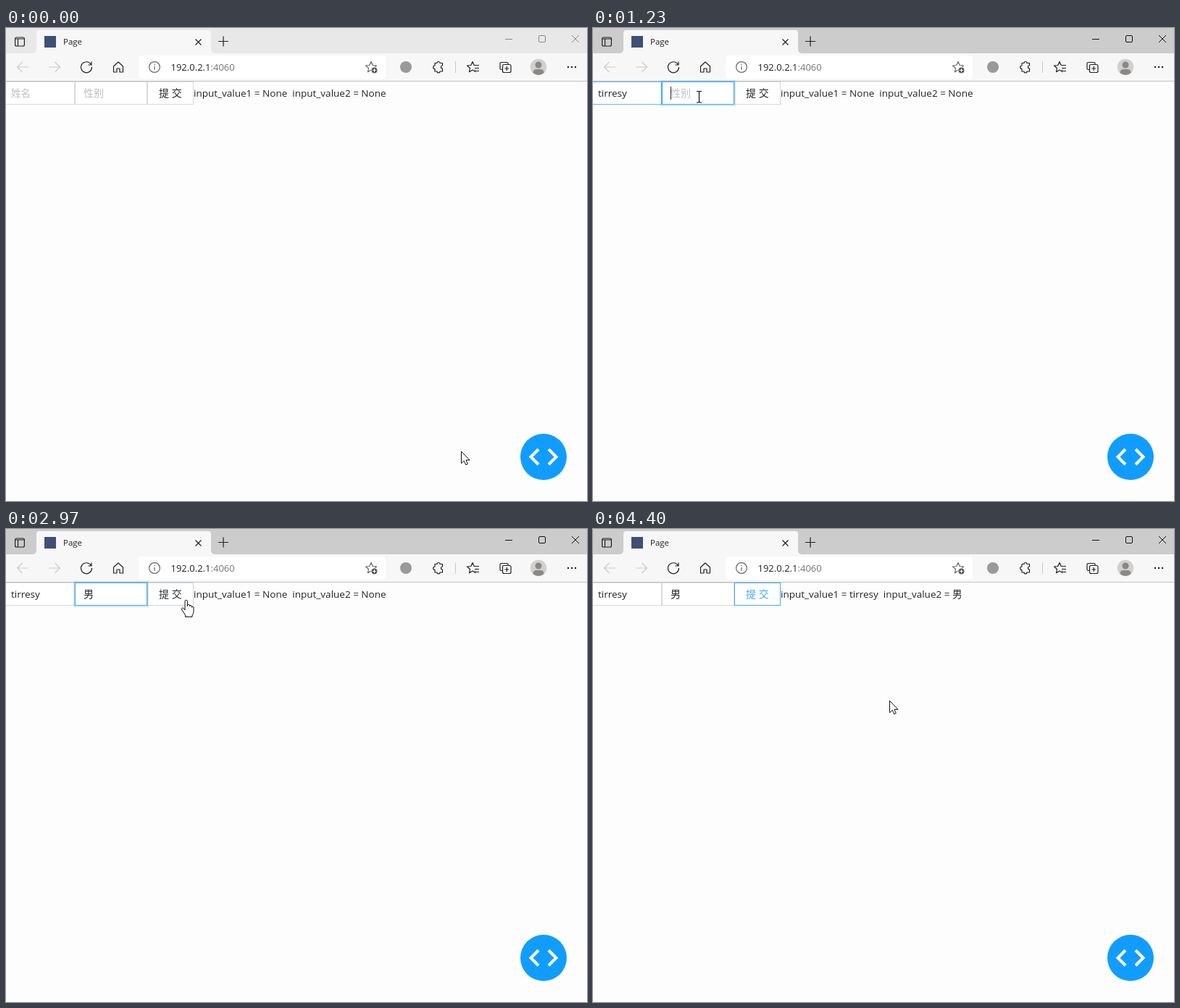
Write an HTML page that moves like this. It is 802x654 px and loops after 4430 ms.

```html
<!DOCTYPE html>
<html lang="zh-CN">
<head>
<meta charset="utf-8">
<title>Form</title>
<style>
  html, body { margin: 0; width: 100%; height: 100%; overflow: hidden; background: #fdfdfd; }
  svg { display: block; cursor: default; }
  text { font: 13.5px "Open Sans", "Noto Sans CJK SC", "Noto Sans CJK", sans-serif; fill: #222; }
  .cn { font-size: 14px; }
  .hint { fill: #bfbfbf; }
  .line { fill: none; stroke: #222; stroke-width: 1.2; }
  .off { stroke: #ccc; }
  .field { fill: #fff; stroke: #d9d9d9; }
  .blue { fill: none; stroke: #40a9ff; }
  .glow { fill: none; stroke: #1890ff; stroke-opacity: .2; stroke-width: 2; }
  .caret { stroke: #222; }
  .shape { fill: #fff; stroke: #111; stroke-linejoin: round; }
  #ime text { font: 16px "Noto Sans CJK SC", "Noto Sans CJK", sans-serif; }
  #ime .num { font: 13.33px "Liberation Mono", monospace; }
  #ime #typed { font: bold 16px "Liberation Sans", Arial, sans-serif; fill: #111; }
</style>
</head>
<body>
<svg width="802" height="654" viewBox="0 0 802 654">
  <!-- title bar -->
  <rect id="bar" width="802" height="36"/>
  <path d="M36 35q6 0 6-6V7q0-4 4-4H279q4 0 4 4V29q0 6 6 6z" fill="#f7f7f7"/>
  <rect class="line" x="12.6" y="13" width="12.8" height="12" rx="2"/>
  <path class="line" d="M13 15H25M16.5 15V25" stroke-width="2"/>
  <rect x="53" y="11" width="16" height="16" fill="#3f4f75"/>
  <text x="79" y="23" style="font-size:11.5px">Page</text>
  <path class="line" d="M261.5 15.5l8 8m0-8l-8 8M293 18.5h14m-7-7v14"/>
  <path id="controls" class="line" style="stroke-width:1" d="M689 15.5h10M737 10.5h6q1.500 0 1.500 1.500v6q0 1.500-1.500 1.500h-6q-1.500 0-1.500-1.500v-6q0-1.500 1.500-1.500M781 10l10 10m0-10l-10 10"/>

  <!-- toolbar -->
  <rect y="35" width="802" height="39" fill="#f7f7f7"/>
  <path d="M0 73.5H802" stroke="#c4c4c4"/>
  <rect x="183" y="38" width="341" height="32" rx="4" fill="#fff"/>
  <path class="line off" d="M31 54H15.500m7-7l-7 7 7 7M59 54H74.500m-7-7l7 7-7 7"/>
  <path class="line" d="M117.500 50.500A7.500 7.500 0 1 0 118.500 54M118 46.500v4.500h-4.500"/>
  <path class="line" d="M148.500 53l6.500-6 6.500 6v8h-4.500v-5h-4v5h-4.500z" stroke-linejoin="round"/>
  <g class="line" style="stroke:#666">
    <circle cx="205" cy="54" r="7.400"/>
    <path d="M205 53v5M205 50v1.500"/>
  </g>
  <text x="227.500" y="59" style="font-size:13px">192.0.2.1<tspan fill="#767676">:4060</tspan></text>
  <defs><path id="star" d="M0-7.500L2.200-2.500 7.500-2 3.500 1.500 4.500 6.800 0 4-4.500 6.800-3.500 1.500-7.500-2-2.200-2.500z"/></defs>
  <g class="line" stroke-linejoin="round">
    <use href="#star" x="504" y="54" stroke="#666"/>
    <use href="#star" x="644" y="54"/>
    <path d="M646 54.500h9M648 58.500h7" stroke="#f7f7f7" stroke-width="5"/>
    <path d="M646 51.500h7M647 55.500h6M648 59.500h5"/>
    <path d="M592 48.500h3a2 2 0 0 1 4 0h3.500v3.500a2 2 0 0 0 0 4v4h-3.500a2 2 0 0 1-4 0H592v-3.500a2 2 0 0 1 0-4.500z"/>
    <path d="M685 57.500h-1.500q-1.500 0-1.500-1.500v-7q0-1.500 1.500-1.500h8q1.500 0 1.500 1.500v1"/>
    <rect x="685.500" y="50.500" width="11.500" height="11" rx="2"/>
    <path d="M691.300 53v6m-3-3h6"/>
  </g>
  <circle cx="508.500" cy="58.500" r="4.500" fill="#555" stroke="#fff"/>
  <path d="M506 58.500h5m-2.500-2.500v5" stroke="#fff"/>
  <circle cx="552" cy="54" r="8" fill="#999"/>
  <path d="M620.500 46v16" stroke="#c8c8c8"/>
  <circle cx="735" cy="54" r="11.300" fill="#d2d0ce"/>
  <circle cx="735" cy="51" r="4.500" fill="#8a8886"/>
  <path d="M727.500 62q0-5 5-5h5q5 0 5 5-7.500 6-15 0" fill="#8a8886"/>
  <path d="M776 54h.01m4.990 0h.01m4.990 0h.01" stroke="#222" stroke-width="2.400" stroke-linecap="round"/>

  <!-- form -->
  <rect class="field" x="-2.500" y="74.500" width="97" height="31"/>
  <rect class="field" x="95.500" y="74.500" width="99" height="31"/>
  <rect class="field" x="195.500" y="74.500" width="63" height="31"/>
  <g id="focus1"><rect class="glow" x="-4" y="73" width="100" height="34"/></g>
  <g id="hover1"><rect class="blue" x="-2.500" y="74.500" width="97" height="31"/></g>
  <g id="focus2"><rect class="glow" x="94" y="73" width="102" height="34"/></g>
  <g id="hover2"><rect class="blue" x="95.500" y="74.500" width="99" height="31"/></g>
  <g id="hover3"><rect class="blue" x="195.500" y="74.500" width="63" height="31"/></g>
  <text id="name" x="7" y="95"></text>
  <text id="sex" class="cn" x="107" y="95"></text>
  <text id="submit" class="cn" x="211" y="95">提 交</text>
  <text id="output" x="259" y="95"></text>
  <path id="caret" class="caret" d="M.5 81v18"/>

  <!-- debug button -->
  <circle cx="742" cy="593" r="32" fill="#119dff"/>
  <path d="M735 582.500L724.500 593 735 603.500M749 582.500L759.500 593 749 603.500" fill="none" stroke="#fff" stroke-width="4"/>

  <!-- input method -->
  <g id="ime">
    <rect id="panel" x="108.500" y="105.500" height="56" rx="2" fill="#fcfcfc" stroke="#b4b4b4" style="filter:drop-shadow(0 1px 1px #0003)"/>
    <rect x="119" y="137" width="40" height="22" fill="#3571b8"/>
    <text id="typed" x="122" y="126"></text>
    <path id="typedCaret" class="caret" d="M.5 112v18"/>
    <g id="choices"></g>
    <g id="pager" class="line" stroke-width="1.500">
      <path d="M-28.500 144l-4.500 4 4.500 4" style="stroke:#aaa"/>
      <path d="M-21 143.500l4.500 4.500-4.500 4.500" style="stroke-width:1.600"/>
    </g>
    <g id="sign" class="line"><circle cx="346" cy="152.500" r="3.200"/><path d="M346 149v-8m-3.500 3.500l3.500-3.500 3.500 3.500M343 147h6"/></g>
  </g>

  <!-- pointer -->
  <g id="pointer">
    <circle id="click" r="11.500" cx="-1.500" fill="#ffff3c" fill-opacity=".8"/>
    <path id="arrow" class="shape" d="M.5.5V17l3.800-3.600L6.700 19l2.600-1.100L7 12.400h5z"/>
    <path id="beam" d="M-3 -7.500h2.500l1 1 1-1H4M.5-7V7.500M-3 8h2.500l1-1 1 1H4" fill="none" stroke="#111" stroke-width="1.200"/>
    <path id="hand" class="shape" d="M-2 14V2a1.700 1.700 0 0 1 3.400 0V9 7.500a1.500 1.500 0 0 1 3 .5V9a1.500 1.500 0 0 1 3 .5v1a1.300 1.300 0 0 1 2.600.5v5q0 3-2 5v2.500H-1.500V21l-4.500-7q-1.500-2.500.5-3 1.500-.2 3.500 3"/>
  </g>
</svg>
<script>
const LOOP = 4430, STEP = 45, NAME = 'tirresy';
const $ = id => document.getElementById(id);
const set = (id, key, value) => $(id).setAttribute(key, value);
const show = (id, on) => set(id, 'opacity', +on);
const ramp = (t, a, b) => Math.min(1, Math.max(0, (t - a) / (b - a)));
const within = (t, a, b) => t >= a && t < b;

// time, x, y
const route = [
  [0, 628, 585], [40, 380, 363], [85, 182, 192], [130, 160, 150], [265, 54, 100],
  [850, 54, 100], [1050, 146, 95], [2410, 146, 95], [2600, 305, 111],
  [2650, 305, 111], [2870, 249, 98], [4200, 249, 98], [4350, 409, 237]
];
const spelling = [
  [1610, 'n', ['你', '能', '年', '呢', '那']],
  [1680, 'na', ['那', '拿', '哪', '呐', '娜']],
  [1750, 'nan', ['男', '南', '难', '你安宁', ' ']]
];

// The pointer is sampled in coarse steps.
function pointerAt(t) {
  const q = Math.max(0, Math.floor((t - 40) / STEP) * STEP + 40);
  const i = route.findIndex(p => p[0] > q);
  if (i < 0) return route.at(-1).slice(1);
  const [a, b] = [route[i - 1], route[i]], k = ramp(q, a[0], b[0]);
  return [1, 2].map(j => Math.round(a[j] + (b[j] - a[j]) * k));
}

function drawPointer(t) {
  const [x, y] = pointerAt(t);
  const kind = y < 107 && x < 195 ? 'beam' : y < 107 && x < 259 ? 'hand'
    : y < 103 && x < 526 ? 'beam' : 'arrow';
  for (const id of ['arrow', 'beam', 'hand']) show(id, id === kind);
  show('click', within(t, 460, 610) || within(t, 1160, 1230) || within(t, 3130, 3230));
  set('pointer', 'transform', `translate(${x} ${y})`);
}

let shown;
function drawIme(t) {
  const on = within(t, 1610, 2210);
  show('ime', on);
  const entry = spelling.findLast(s => t >= s[0]);
  if (!on || entry === shown) return;
  shown = entry;
  const [, typed, words] = entry;
  let x = 123;
  $('choices').innerHTML = words.map((word, i) => {
    const left = x, fill = i ? '#222' : '#fff';
    x += 26 + 16 * word.length - (i ? 0 : 1);
    return `<text class="num" x="${left}" y="154" style="fill:${fill}">${i + 1}.</text>
      <text x="${left + 16}" y="154" style="fill:${fill}">${word}</text>`;
  }).join('');
  const right = x + 47;
  $('typed').textContent = typed;
  set('typedCaret', 'transform', `translate(${122 + Math.round($('typed').getComputedTextLength()) + 1} 0)`);
  set('panel', 'width', right - 108.5);
  set('pager', 'transform', `translate(${right} 0)`);
  show('sign', typed === 'nan');
}

function label(id, text, hint) {
  $(id).textContent = text || hint;
  $(id).classList.toggle('hint', !text);
}

function drawForm(t) {
  const count = Math.max(0, Math.floor((t - 620) / 33));
  const name = NAME.slice(0, count), composing = within(t, 1610, 2210);
  label('name', name, '姓名');
  label('sex', t >= 2210 ? '男' : composing ? '.' : '', '性别');
  const done = t >= 3300;
  $('output').textContent = `input_value1 = ${done ? NAME : 'None'}\u00a0 input_value2 = ${done ? '男' : 'None'}`;

  show('hover1', ramp(t, 190, 330) * (1 - ramp(t, 1190, 1340)));
  show('focus1', ramp(t, 600, 690) * (1 - ramp(t, 1150, 1260)));
  show('hover2', ramp(t, 950, 1090) * (1 - ramp(t, 3150, 3410)));
  show('focus2', ramp(t, 1150, 1230) * (1 - ramp(t, 3150, 3300)));
  const press = ramp(t, 2950, 3200);
  show('hover3', press);
  $('submit').style.fill = `color-mix(in srgb, #40a9ff ${press * 100}%, #222)`;

  const typing = within(t, 610, 1160);
  show('caret', typing || within(t, 1160, 2410));
  const x = typing ? 7 + Math.round(name && $('name').getComputedTextLength())
    : composing ? 110 : t < 1610 ? 107 : 121;
  set('caret', 'transform', `translate(${x} 0)`);
}

function draw() {
  const t = performance.now() % LOOP, active = t >= 460;
  set('bar', 'fill', active ? '#ccc' : '#e8e8e8');
  $('controls').style.stroke = active ? '#111' : '#888';
  drawForm(t);
  drawIme(t);
  drawPointer(t);
  requestAnimationFrame(draw);
}
draw();
</script>
</body>
</html>
```
